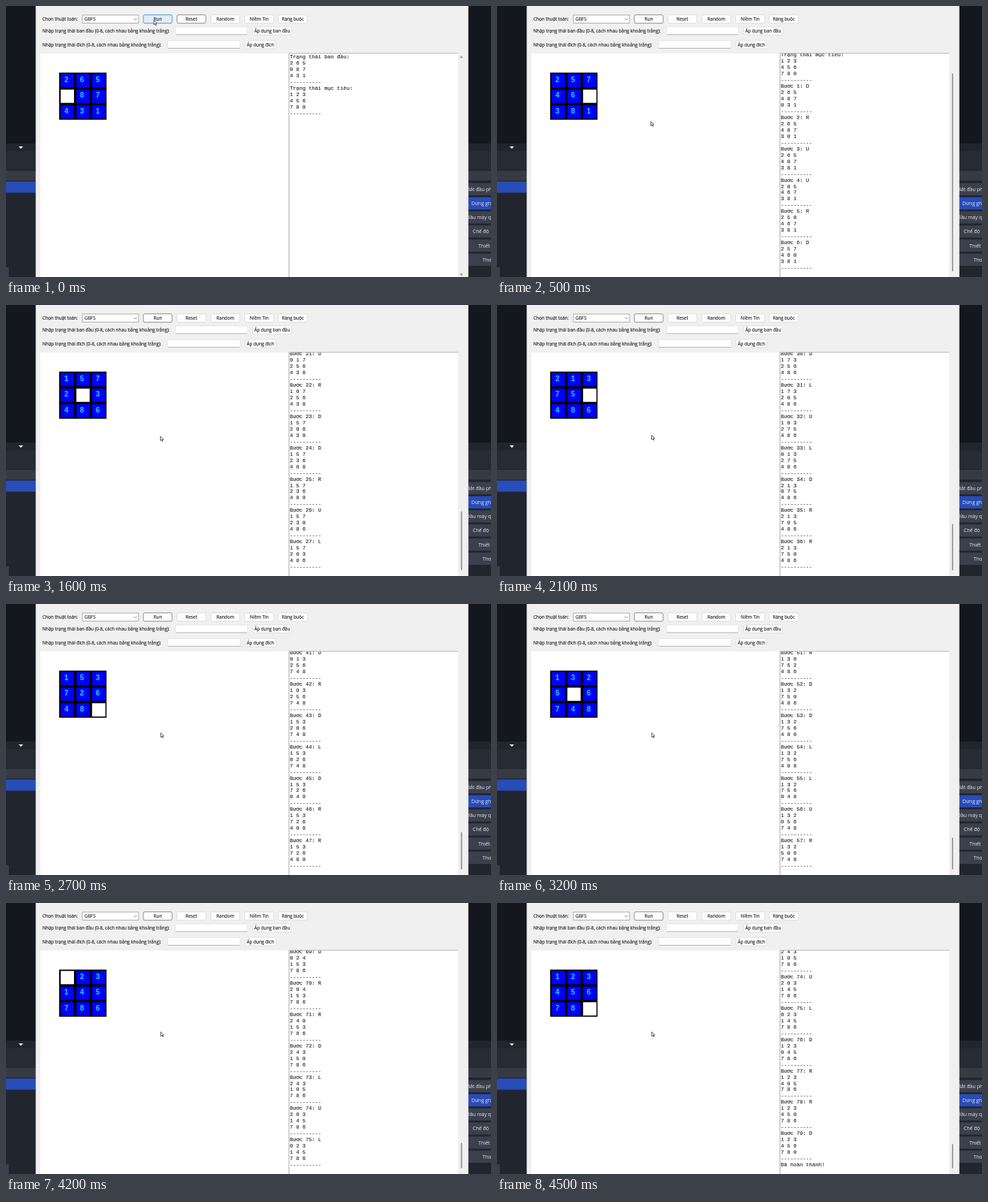
An HTML page for the animation above (5.1 s loop, 692 by 388 pixels).

```html
<!DOCTYPE html>
<html lang="vi">
<head>
<meta charset="utf-8">
<title>8-puzzle</title>
<style>
  html, body { margin: 0; width: 100%; height: 100%; overflow: hidden; background: #f0f0f0; }
  svg { display: block; width: 692px; height: 388px; }
  .ui { font: 6.43px "Open Sans", "Noto Sans", sans-serif; fill: #1a1a1a; stroke: #1a1a1a; stroke-width: 0.12px; }
  .dark { font: 7.05px "Open Sans", "Noto Sans", sans-serif; fill: #e8e9ec; }
  .log { font: 7.47px "Liberation Mono", "Courier New", monospace; fill: #1c1c1c; stroke: #1c1c1c; stroke-width: 0.1px; }
  .digit { font: bold 10.4px "Liberation Sans", Arial, sans-serif; fill: #1fd6f2; text-anchor: middle; }
</style>
</head>
<body>
<svg id="stage" viewBox="0 0 692 388"></svg>
<script>
const stage = document.getElementById("stage");
const LOOP = 5100, TICK = 100, LAST_TICK = 45;
const START = "265087431", GOAL = "123456780";
const MOVES = "DRUURDLURDDLURULDDLUURDDRULURDLULDRRDLLUURDLDRR" +
  "ULURDDLLURDRUULDRULDLURRDLULDRRD";
const OFFSET = { U: -3, D: 3, L: -1, R: 1 };
const RULE = "-".repeat(10);
const PITCH = 8.96, FIRST_Y = 73, LAST_Y = 375;

function set(el, attrs) {
  for (const key in attrs) el.setAttribute(key, attrs[key]);
}
function add(tag, attrs, parent = stage) {
  const el = document.createElementNS("http://www.w3.org/2000/svg", tag);
  set(el, attrs);
  parent.appendChild(el);
  return el;
}
function rect(x, y, width, height, fill, more = {}, parent = stage) {
  return add("rect", { x, y, width, height, fill, ...more }, parent);
}
function label(x, y, text, cls = "ui", more = {}, parent = stage) {
  const el = add("text", { x, y, class: cls, ...more }, parent);
  el.textContent = text;
  return el;
}
function button(x, y, width, text, height = 12) {
  const box = rect(x, y, width, height, "#fdfdfd", { rx: 2, stroke: "#d6d6d6", "stroke-width": 0.7 });
  label(x + width / 2, y + height / 2 + 2.4, text, "ui", { "text-anchor": "middle" });
  return box;
}
function entry(x, y, width) {
  rect(x, y, width, 11, "#fff", { rx: 1.5, stroke: "#dedede", "stroke-width": 0.7 });
  rect(x + 0.5, y + 10.6, width - 1, 0.7, "#a0a0a0");
}

// Every board from start to solution, and the log up to each step.
const boards = [START];
for (const move of MOVES) {
  const cells = [...boards[boards.length - 1]];
  const from = cells.indexOf("0"), to = from + OFFSET[move];
  [cells[from], cells[to]] = [cells[to], cells[from]];
  boards.push(cells.join(""));
}
const block = (title, board) =>
  [title, ...board.match(/.../g).map(row => [...row].join(" ")), RULE];
const log = [...block("Trạng thái ban đầu:", START), ...block("Trạng thái mục tiêu:", GOAL)];
[...MOVES].forEach((move, i) => log.push(...block(`Bước ${i + 1}: ${move}`, boards[i + 1])));
log.push("Đã hoàn thành!");

// Dark application behind the window
rect(0, 0, 692, 388, "#21252e");
rect(0, 0, 692, 197, "#15171f");
rect(0, 208, 692, 27, "#272b34");
rect(0, 236, 692, 14, "#363a43");
rect(0, 251.3, 42.5, 16, "#284cb8");
rect(0, 374, 4, 14, "#3c404d", { rx: 1 });
add("path", { d: "M18 201h6.4l-3.2 3.4z", fill: "#f2f2f2" });
[["Bắt đầu phát", 657.5], ["Dừng ghi", 664], ["Đầu máy quay", 656.8],
 ["Chế độ", 666], ["Thiết lập", 674], ["Thoát", 680]].forEach(([text, x], i) => {
  const y = 253.5 + 20.2 * i;
  rect(650, y, 50, 17.5, i === 1 ? "#284cb8" : "#3c404d");
  label(x, y + 11.2, text, "dark");
});

// Window and controls
rect(42.4, 0, 617.3, 388, "#f0f0f0");
label(52, 21.3, "Chọn thuật toán:");
rect(109, 13, 80, 11.5, "#fff", { stroke: "#8c8c8c", "stroke-width": 0.7 });
label(112, 21.3, "GBFS");
add("path", { d: "M182.3 17.8l2.2 2.2 2.2-2.2", fill: "none", stroke: "#555", "stroke-width": 0.7 });
const run = button(196, 12.7, 41, "Run");
const reset = button(244, 12.7, 41, "Reset");
button(292.5, 12.7, 41, "Random");
button(340.5, 12.7, 41.5, "Niềm Tin");
button(388.5, 12.7, 41.5, "Ràng buộc");
label(52, 38.2, "Nhập trạng thái ban đầu (0-8, cách nhau bằng khoảng trắng):");
entry(242, 30, 102.5);
button(352, 29.7, 55.5, "Áp dụng ban đầu");
label(52, 57.6, "Nhập trạng thái đích (0-8, cách nhau bằng khoảng trắng):");
entry(230.5, 49.5, 103.5);
button(341, 49.2, 44, "Áp dụng đích");

// Puzzle
rect(49, 68, 354, 320, "#fff");
rect(75.8, 95.4, 67.6, 67.4, "#000");
const tiles = Array.from({ length: 9 }, (_, i) => {
  const dx = 22.4 * (i % 3), dy = 22.4 * Math.floor(i / 3);
  return {
    box: rect(78 + dx, 97.3 + dy, 19, 19, "#00f"),
    digit: label(86.1 + dx, 109 + dy, "", "digit")
  };
});

// Log and scrollbar
rect(403.5, 67.5, 241.5, 321, "#9c9c9c");
rect(404.3, 68.2, 240.7, 320, "#fff");
const clip = add("clipPath", { id: "view" });
rect(404, 68.3, 241, 320, "#fff", {}, clip);
const view = add("g", { "clip-path": "url(#view)" });
const rows = Array.from({ length: 36 }, () => label(405, 0, "", "log", {}, view));
const arrows = add("path", { d: "M647.2 74.5h5l-2.5-3.8zM647.2 383h5l-2.5 3.8z", fill: "#a3a3a3" });
const thumb = rect(649.2, 0, 1.5, 0, "#858585", { rx: 0.7 });

const cursor = add("path", {
  d: "M0 0v6.2l1.5-1.3 1 2.2 1-.4-1-2.2h1.9z",
  fill: "#fff", stroke: "#111", "stroke-width": 0.7
});

// time, x, y of the pointer tip
const POINTER = [[0, 211, 20.5], [200, 211, 20.5], [600, 221, 192], [900, 221.5, 200.5],
  [1600, 220.3, 188], [2100, 220.6, 186.5], [2700, 220.8, 184.5], [LOOP, 220.8, 184.5]];

function pointerAt(t) {
  const i = POINTER.findIndex(p => p[0] > t);
  const [a, b] = [POINTER[i - 1], POINTER[i]];
  const u = (t - a[0]) / (b[0] - a[0]), ease = u * u * (3 - 2 * u);
  return [1, 2].map(k => a[k] + (b[k] - a[k]) * ease);
}

function drawLog(count) {
  const top = Math.min(FIRST_Y, LAST_Y - PITCH * (count - 1));
  const first = Math.max(0, count - rows.length);
  rows.forEach((row, i) => {
    const n = first + i;
    row.textContent = n < count ? log[n] : "";
    row.setAttribute("y", top + PITCH * n + 2);
  });
  const scrolls = top < FIRST_Y;
  const height = 7.2 + 11326 / (count + 1);
  arrows.setAttribute("visibility", scrolls ? "hidden" : "visible");
  set(thumb, { y: 380 - height, height, visibility: scrolls ? "visible" : "hidden" });
}

function render(time) {
  const tick = Math.min(LAST_TICK, Math.floor((time % LOOP) / TICK));
  const step = Math.max(0, Math.min(MOVES.length, Math.floor(14.2 + 1.87 * (tick - 9))));

  tiles.forEach(({ box, digit }, i) => {
    const value = boards[step][i];
    box.setAttribute("fill", value === "0" ? "#fff" : "#00f");
    digit.textContent = value === "0" ? "" : value;
  });
  drawLog(tick === LAST_TICK ? log.length : 10 + 5 * step);

  const [x, y] = pointerAt(tick * TICK);
  cursor.setAttribute("transform", `translate(${x} ${y})`);
  const hover = y < 25;
  set(run, {
    fill: hover ? "#e0eef9" : "#fdfdfd",
    stroke: hover ? "#0078d4" : "#606060"
  });
  reset.setAttribute("stroke", tick === 0 ? "#606060" : "#d6d6d6");
}

const origin = performance.now();
function loop() {
  render(performance.now() - origin);
  requestAnimationFrame(loop);
}
loop();
</script>
</body>
</html>
```
